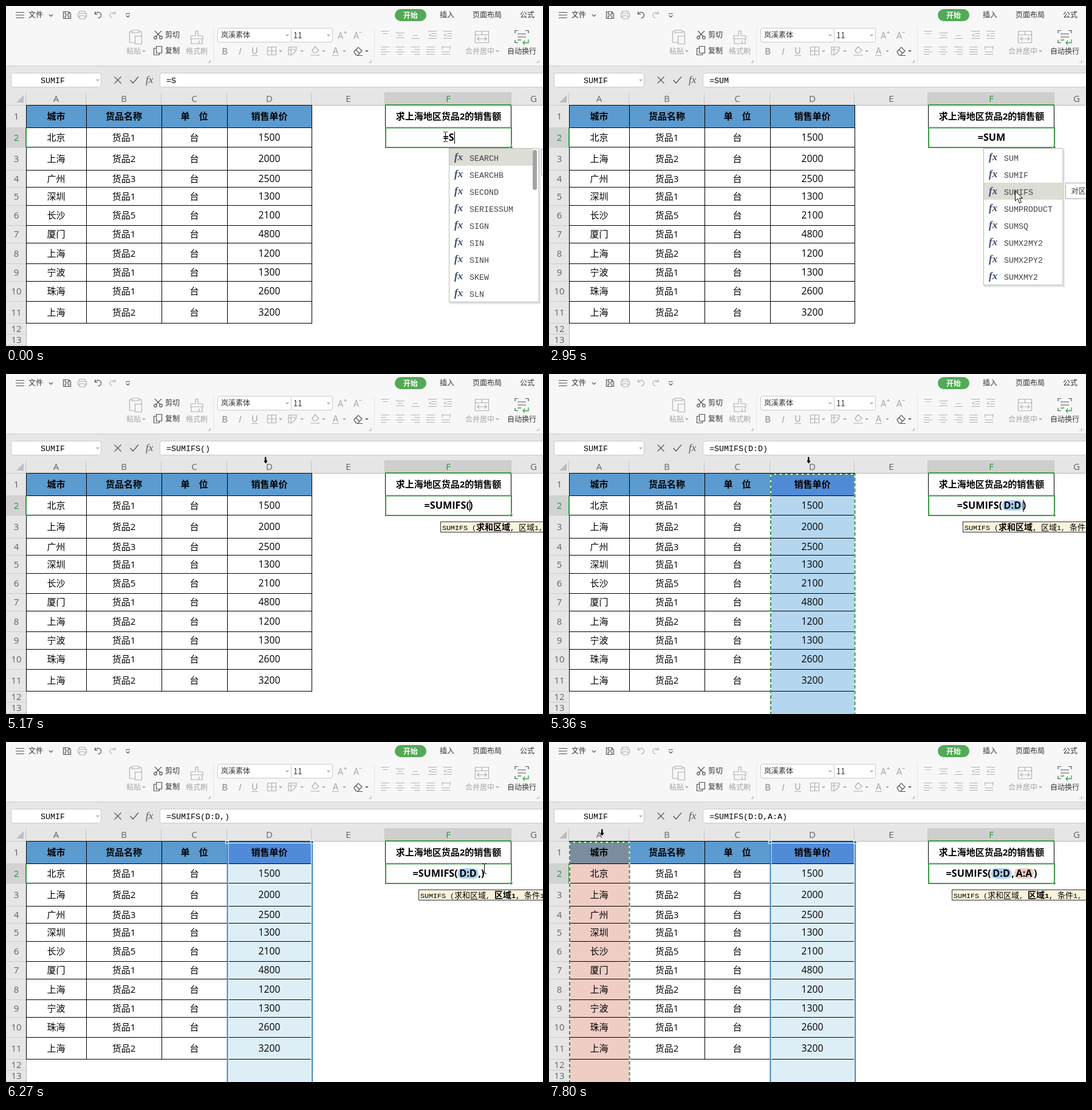
An HTML page for the animation above (8000 ms loop, 884 by 560 pixels).

```html
<!DOCTYPE html>
<html lang="zh-CN">
<head>
<meta charset="utf-8">
<title>SUMIFS</title>
<style>
html, body { margin: 0; width: 100%; height: 100%; overflow: hidden; background: #fff; }
svg { display: block; width: 884px; height: 560px; }
text { font: 12px "Noto Sans CJK SC", "Noto Sans", sans-serif; fill: #333; white-space: pre; }
.mid { text-anchor: middle; }
.off { fill: #a6a6a6; }
.cell { font: 15px "Open Sans", "Noto Sans CJK SC", sans-serif; fill: #000; }
.num { font-size: 15.7px; }
.bold { font-weight: 700; }
.head { fill: #626262; }
.live { fill: #2f8f3a; }
.edit { font: 700 16.2px "Open Sans", "Noto Sans", sans-serif; fill: #000; }
.mono { font: 13.33px "Liberation Mono", monospace; fill: #000; }
.item { fill: #444; }
.fx { font: italic 700 17px "Liberation Serif", serif; fill: #3c4f6b; }
.tip { font: 11.67px "Liberation Mono", "Noto Sans CJK SC", monospace; fill: #000; }
.han { font: 13px "Noto Sans CJK SC", sans-serif; }
.tip .strong { font-weight: 700; }
.strong.han { font-size: 14px; }
.ico { fill: none; stroke: #555; stroke-width: 1.2; }
.dim { stroke: #b2b2b2; }
</style>
</head>
<body>
<svg viewBox="0 0 884 560" xmlns="http://www.w3.org/2000/svg">
  <g id="base"></g><g id="tint"></g><g id="cells"></g><g id="live"></g>
</svg>
<script>
(() => {
const LOOP = 8000;
const cols = [33, 132, 256, 364, 503, 624, 832, 905];
const rows = [163, 200, 232, 270, 298, 328, 361, 390, 424, 453, 486, 522, 540, 558];
const cities = '北京 上海 广州 深圳 长沙 厦门 上海 宁波 珠海 上海'.split(' ');
const goods = [1, 2, 3, 1, 5, 1, 2, 1, 1, 2];
const prices = [1500, 2000, 2500, 1300, 2100, 4800, 1200, 1300, 2600, 3200];

const $ = id => document.getElementById(id);
const text = (x, y, s, c = '') => `<text x="${x}" y="${y}" class="${c}">${s}</text>`;
const rect = (x, y, w, h, fill, more = '') =>
  `<rect x="${x}" y="${y}" width="${w}" height="${h}" fill="${fill}" ${more}/>`;
const icon = (d, c = '') => `<path class="ico ${c}" d="${d}"/>`;
const line = (d, color, w = 1) => `<path d="${d}" stroke="${color}" stroke-width="${w}" fill="none"/>`;
const field = (x, y, w, h, r) => rect(x + .5, y + .5, w, h, '#fff', `rx="${r}" stroke="#c9c9c9"`);
const arrow = (x, y, color = '#aaa') => `<path d="M${x - 3} ${y}h6l-3 3z" fill="${color}"/>`;
const mid = (list, i) => (list[i] + list[i + 1]) / 2;

// a stack of horizontal strokes: widths from the top, aligned by k (0 left, .5 centre, 1 right)
const strokes = (x, y, widths, k, gap = 4) =>
  widths.map((w, i) => `M${x + (14 - w) * k} ${y + i * gap + .5}h${w}`).join('');

function ribbon() {
  const labels = [
    [37, 19, '文件'], [714, 19, '插入'], [768, 19, '页面布局'], [846, 19, '公式'],
    [262, 52, '剪切'], [262, 78, '复制'], [825, 79, '自动换行'],
    [198, 79, '粘贴', 'off'], [296, 79, '格式刷', 'off'], [756, 79, '合并居中', 'off']
  ];
  const letters = [
    [546, 54, 'A'], [572, 54, 'A'], [355, 80, '<tspan font-weight="700">B</tspan>'],
    [382, 80, '<tspan font-style="italic">I</tspan>'], [404, 79, 'U'], [538, 79, 'A']
  ];
  return rect(0, 0, 884, 99, '#f7f7f8') + rect(0, 99, 884, 64, '#e6e6e6') +
    line('M0 98.5H884', '#d2d2d2') +
    rect(640, 5, 52, 20, '#52aa55', 'rx="10"') +
    `<text x="666" y="19.5" class="mid bold" style="fill:#fff">开始</text>` +
    labels.map(a => text(...a)).join('') +
    icon('M16 10.5h14M16 15h14M16 19.5h14M71 14l3 3 3-3M197 12.5h7M197.5 15.5l3 3 3-3') +
    icon('M94.5 9.5h9l3 3v8h-12zM97.5 9.5v4h6v-4M97.5 20v-4h6v4') +
    icon('M121 12v-3.5h9v3.5M121 18h-2.5v-6h14v6h-2.5M121 16h9v5h-9z', 'dim') +
    icon('M180 9v4h-4.5M180 13c-3-4-9-2-9 2 0 2 2 4 4 4.5', 'dim') +
    icon('M207 42h-3.5v18h8M219 42h4v7M207 40h12v4h-12zM212.5 49.5h11v13h-11z', 'dim') +
    icon('M245 41l9 9M256 41l-9 9') +
    '<g class="ico"><circle cx="246" cy="52" r="2.3"/><circle cx="255" cy="52" r="2.3"/></g>' +
    icon('M247.5 66.5h9v11h-9zM247 69.5h-3.5v11h9v-3') +
    icon('M312 41h4v8h8v5h-20v-5h8zM305 54v8h18v-8M318 57v5', 'dim') +
    icon('M332 93h4v-4M597 93h4v-4M873 93h4v-4', 'dim') +
    line('M341.5 35V92M606.5 35V92', '#e6e6e6') +
    field(348, 36, 121, 23, 3) + field(469, 36, 68, 23, 3) +
    text(354, 52, '岚溪素体') + `<text x="473" y="52.5" style="font-size:13px">11</text>` +
    [[463, 47], [531, 47], [227, 73], [452, 73], [487, 73], [523, 73], [557, 73], [809, 73], [151, 121]]
      .map(p => arrow(...p)).join('') + arrow(594, 73, '#666') +
    letters.map(([x, y, s]) =>
      `<text x="${x}" y="${y}" class="off" style="font-size:15px">${s}</text>`).join('') +
    icon('M556 43.5h5M558.5 41v5M581 43.5h5M404 81.5h11M537 81.5h11', 'dim') +
    icon('M430.5 67.5h14v13h-14zM437.5 67v14M430 74h14', 'dim') +
    icon('M478 72v-4.5h-13v13h6M465 72h13M469 67v13M471 80l7-7', 'dim') +
    icon('M504 73l5-6 6 6-5 4h-4zM501 81h16', 'dim') +
    icon('M573 75l7-7 6 6-7 7h-3zM576 72l6 6M578 81.5h9') +
    icon(strokes(617, 41, [14, 8], .5) + strokes(642, 44, [14, 8, 14], .5) + strokes(667, 48, [8, 14], .5, 5) +
      [695, 720].map(x => strokes(x, 41, [14], 0) + strokes(x + 6, 45, [8, 8], 0) + strokes(x, 53, [14], 0)).join('') +
      'M700 46l-3 2 3 2M721 46l3 2-3 2', 'dim') +
    icon(strokes(617, 67, [14, 9, 14, 9], 0) + strokes(642, 67, [14, 8, 14, 8], .5) +
      strokes(667, 67, [14, 9, 14, 9], 1) + strokes(692, 67, [14, 14, 14, 14], 0) +
      strokes(717, 67, [14], 0) + strokes(717, 75, [14, 14], 0) + 'M718 66v6M731 66v6', 'dim') +
    icon('M772.5 41.5h22v19h-22zM772 47.5h22M783.5 41v6M776 54h15M779 51l-3 3 3 3M788 51l3 3-3 3', 'dim') +
    icon('M838 45v-4.5h5M855 40.5h5v4.5M838 56v4.5h5M842 46h14M842 51h14') +
    line('M842 56h6M860 55v5.5h-9M854 57l-3 3.5 3 3', '#43a047', 1.3) +
    field(8, 110, 148, 23, 4) + field(253, 110, 660, 23, 4) + arrow(151, 121) +
    text(57, 127, 'SUMIF', 'mono') +
    icon('M178.5 116.5l11 11M189.5 116.5l-11 11M204.5 122l4.5 5 9-10.5') +
    `<text x="230" y="127" class="fx" style="font-weight:400;fill:#555">fx</text>`;
}

function sheet() {
  let s = rect(33, 164, 851, 396, '#fff') + rect(0, 163, 33, 397, '#e6e6e6') +
    rect(624, 142, 208, 21, '#cecece') + rect(0, 200, 33, 32, '#d2d2d2') +
    rect(33, 164, 470, 36, '#5b9bd0') +
    '<path d="M29 147v12h-12z" fill="#bdbdbd"/>';
  cols.forEach(x => s += line(`M${x - .5} 143V163`, '#c6c6c6'));
  rows.forEach(y => s += line(`M0 ${y + .5}H33`, '#cdcdcd'));
  return s + line('M33 163.5H884M33.5 163V560', '#b5b5b5');
}

function table() {
  let s = '';
  rows.slice(0, 12).forEach(y => s += line(`M33 ${y + .5}H504`, '#000'));
  cols.slice(0, 5).forEach(x => s += line(`M${x + .5} 163V523`, '#000'));
  s += line('M624.5 163V200M831.5 163V200', '#000') + line('M624 163H832', '#3a9a41', 2) +
    line('M33 200V233', '#3a9a41', 2);
  [...'ABCDEFG'].forEach((c, i) =>
    s += text(mid(cols, i), 158, c, `cell mid ${i === 5 ? 'live' : 'head'}`));
  for (let r = 0; r < 13; r++)
    s += text(17, mid(rows, r) + 5.5, r + 1, `cell mid ${r === 1 ? 'live' : 'head'}`);
  ['城市', '货品名称', '单　位', '销售单价'].forEach((h, i) =>
    s += text(mid(cols, i), 187, h, 'cell bold mid'));
  cities.forEach((city, i) => [city, '货品' + goods[i], '台', prices[i]].forEach((v, c) =>
    s += text(mid(cols, c), mid(rows, i + 1) + 5.5, v, 'cell mid' + (c === 3 ? ' num' : ''))));
  return s + text(728.5, 187, '求上海地区货品2的销售额', 'cell bold mid');
}

const last = (list, t) => list.filter(e => e[0] <= t).pop();

const PICK_D = 5265, COMMA = 6020, PICK_A = 7680;
const formulas = [[0, '=S'], [60, '=SU'], [2430, '=SUM'], [3150, '=SUMIFS()'],
  [PICK_D, '=SUMIFS(D:D)'], [COMMA, '=SUMIFS(D:D,)'], [PICK_A, '=SUMIFS(D:D,A:A)']];
const carets = [[0, 580], [1040, 1570], [2100, 2820], [3150, 3580], [4120, 4650],
  [5170, 5620], [COMMA, 6187], [6800, 7260]];
// start, end, steps, from x, y, to x, y
const moves = [
  [2430, 2560, 2, 723, 215, 768, 306], [3350, 3660, 5, 768, 306, 417, 142],
  [4650, 4710, 2, 417, 142, 427, 142], [6020, 6270, 4, 427, 142, 787, 208],
  [7260, 7620, 7, 787, 208, 87, 149]];
// time, x, width, names, scroll thumb
const lists = [
  [0, 729, 148, 'SEARCH SEARCHB SECOND SERIESSUM SIGN SIN SINH SKEW SLN', 66],
  [60, 723, 139, 'SUBSTITUTE SUBTOTAL SUM SUMIF SUMIFS SUMPRODUCT SUMSQ SUMX2MY2 SUMX2PY2', 222],
  [2430, 715, 131, 'SUM SUMIF SUMIFS SUMPRODUCT SUMSQ SUMX2MY2 SUMX2PY2 SUMXMY2', 0],
  [3150]];
// time, x, y, height, text
const hints = [[0, 881, 235, 43, ''], [120, 867, 235, 26, '将'],
  [2430, 850, 235, 26, '返回'], [2820, 850, 291, 26, '对区']];

const pen = document.createElement('canvas').getContext('2d');
pen.font = '700 16.2px "Open Sans", "Noto Sans", sans-serif';

function editor(t, formula) {
  const parts = formula.split(/(\w:\w|\)$)/).filter(Boolean).map(s => {
    const ref = s.includes(':');
    return { s, ref, w: pen.measureText(s).width + (ref ? 5 : 0) };
  });
  let x = 728.5 - parts.reduce((sum, p) => sum + p.w, 0) / 2, out = '', caret;
  for (const { s, ref, w } of parts) {
    if (s === ')') caret = x;
    if (ref) out += rect(x, 208, w, 17, s[0] === 'D' ? '#abd0ee' : '#efcbc2', 'rx="7"');
    out += text(x + (ref ? 2.5 : 0), 222, s, 'edit');
    x += w;
  }
  const blink = carets.some(([a, b]) => t >= a && t < b);
  return rect(625, 200.5, 207, 32.5, 'none', 'stroke="#3a9a41" stroke-width="2"') +
    rect(829, 230, 5, 5, '#3a9a41', 'stroke="#fff"') + out +
    (blink ? rect(Math.round(caret ?? x), 207, 1, 20, '#000') : '');
}

function argTip(t) {
  const x = t < PICK_D ? 715 : t < COMMA ? 681 : t < PICK_A ? 679 : 663;
  const bold = t < COMMA ? '求和区域,' : '区域1,';
  const words = ['SUMIFS (', '求和区域,', ' ', '区域1,', ' ', '条件1,', ' ...)'];
  const spans = words.map(w => w.replace(/[一-龥]+|[^一-龥]+/g, run =>
    `<tspan class="${/[一-龥]/.test(run) ? 'han' : ''} ${w === bold ? 'strong' : ''}">${run}</tspan>`));
  return rect(x + .5, 243.5, 300, 17, '#fbf3dd', 'stroke="#333"') + text(x + 3, 257, spans.join(''), 'tip');
}

function popup(t) {
  const [, x, w, names, thumb] = last(lists, t);
  if (!names) return argTip(t);
  const items = names.split(' '), h = items.length * 28 + 2;
  const pick = t >= 2820 ? 2 : 0;
  let s = rect(x + 1, 236, w + 2, h + 1, '#000', 'opacity=".1"') +
    rect(x + .5, 234.5, w - .5, h - 1, '#fff', 'stroke="#b9b9b9"') +
    rect(x + 1, 235 + pick * 28, w - (thumb ? 11 : 1), 28, '#dddcd5');
  items.forEach((name, i) => s += text(x + 9, 254 + i * 28, 'fx', 'fx') +
    text(x + 34, 255 + i * 28, name, 'mono item'));
  if (thumb) s += rect(x + w - 10, 237, 7, thumb, '#a3a3a3', 'rx="3.5"');
  const [, hx, hy, hh, label] = last(hints, t);
  return s + rect(hx + .5, hy + .5, 99, hh, '#fff', 'stroke="#a9a9a9"') + text(hx + 9.5, hy + 18, label);
}

function ants(x, w, t, start) {
  const shift = Math.max(0, Math.floor((t - start) / 200)) * 3;
  const box = more => rect(x, 165, w, 420, 'none', `stroke-width="2" ${more}`);
  return box('stroke="#fff"') + box(`stroke="#3a9455" stroke-dasharray="6 3" stroke-dashoffset="${-shift}"`);
}

function selection(t) {
  let s = '';
  if (t >= PICK_D && t < COMMA) s += ants(365, 138.5, t, 5420);
  if (t >= COMMA) s += rect(366, 166.5, 136.5, 420, 'none', 'stroke="#fff"') +
    rect(364.5, 165, 139.5, 420, 'none', 'stroke="#4384bd" stroke-width="2"') +
    [364, 504].map(x => rect(x - 2.5, 162.5, 5, 5, '#4384bd', 'stroke="#fff"')).join('');
  return s + (t >= PICK_A ? ants(34, 98.5, t, 7800) : '');
}

function tints(t) {
  const tint = (x, w, head, body) => rect(x, 164, w, 36, head) + rect(x, 200, w, 360, body);
  return (t >= PICK_D ? tint(364, 140, '#518ad7', t < COMMA ? '#b4d6ef' : '#deeef7') : '') +
    (t >= PICK_A ? tint(34, 99, '#7b8c9f', '#f0cdc4') : '');
}

function pointer(t) {
  let x = 723, y = 215;
  for (const [a, b, n, x0, y0, x1, y1] of moves) {
    if (t < a) break;
    const step = Math.min(n, Math.floor((t - a) / (b - a) * (n - 1) + 1e-6) + 1), k = step / n;
    x = Math.round(x0 + (x1 - x0) * k);
    y = Math.round(y0 + (y1 - y0) * k);
  }
  const shape = (d, fill) => `<path transform="translate(${x} ${y})" d="${d}" fill="${fill}" stroke="#000"/>`;
  if (y < 163) return shape('M-.5 -5h1.5v6h2l-2.5 4-2.5-4h1.5z', '#000');
  if (t >= 2430 && t < 3150 && y > 235) return shape('M-.5 -1v16l4-3.5 3 7 3-1.5-3-6.5h5z', '#fff');
  if (x > 624 && x < 832 && y > 199 && y < 233)
    return shape('M-3 -7.5h2.5l1 1 1-1h2.5M.5 -6.5v14M-3 8.5h2.5l1-1 1 1h2.5', 'none');
  return shape('M-2.5 -8.5h5v6h6v5h-6v6h-5v-6h-6v-5h6z', '#fff');
}

function overlay(t) {
  const formula = last(formulas, t)[1];
  const busy = (t >= PICK_D && t < COMMA) || t >= PICK_A;
  return icon('M146.5 9v4.5h4.5M146.5 13c3-4.5 10-3 10 2 0 2.5-2 4.5-5 5', busy ? 'dim' : '') +
    text(264, 127, formula, 'mono') + selection(t) + editor(t, formula) + popup(t) + pointer(t);
}

$('base').innerHTML = ribbon() + sheet();
$('cells').innerHTML = table();

const shown = {};
function put(id, markup) {
  if (shown[id] !== markup) $(id).innerHTML = shown[id] = markup;
}
const born = performance.now();
function draw() {
  const t = (performance.now() - born) % LOOP;
  put('tint', tints(t));
  put('live', overlay(t));
  requestAnimationFrame(draw);
}
draw();
})();
</script>
</body>
</html>
```
